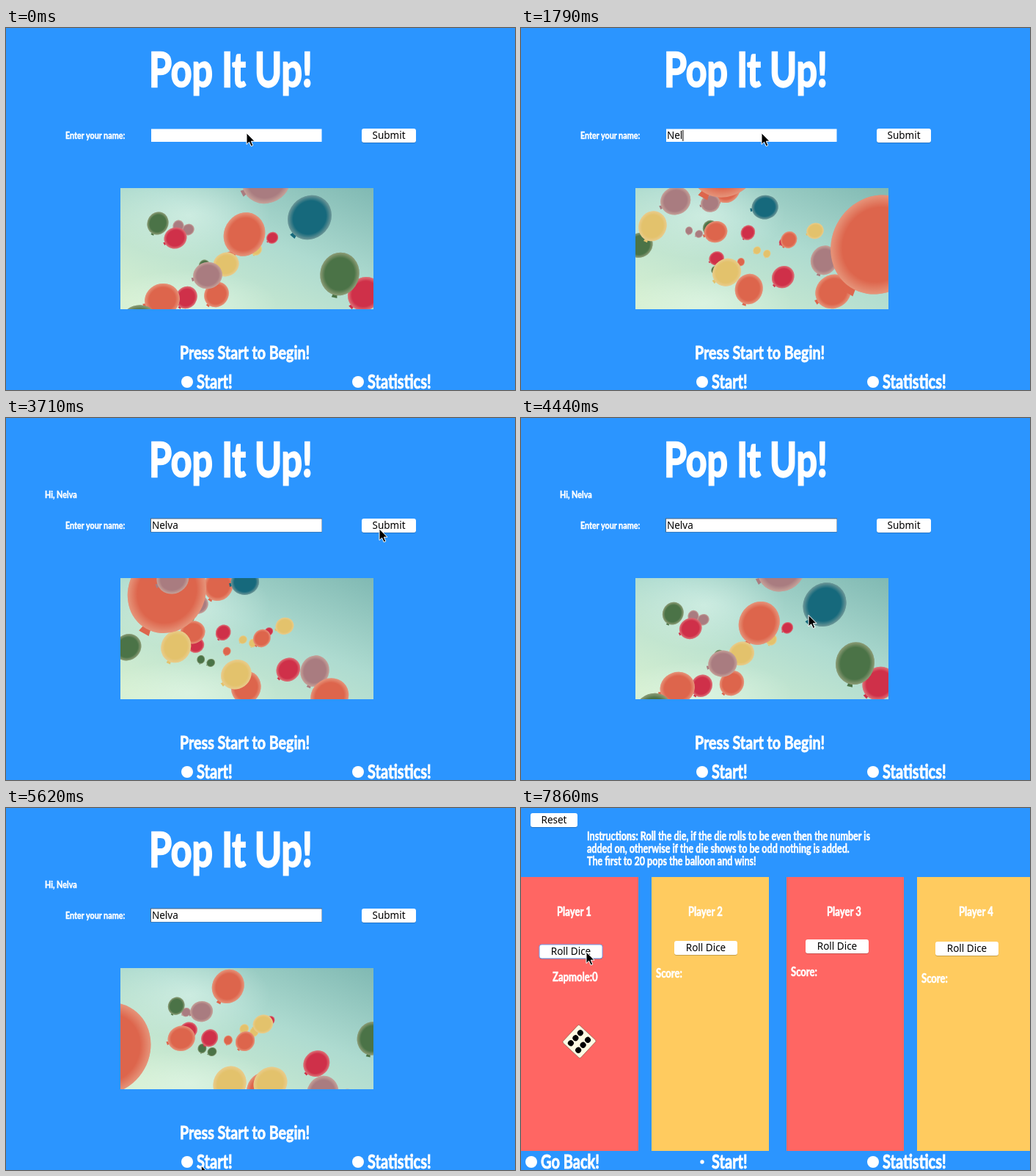
Recreate the animation shown at these times as an HTML page. Size 694 px wide and 493 px high, loop 8 s.

```html
<!DOCTYPE html>
<html lang="en">
<head>
<meta charset="utf-8">
<title>Pop It Up!</title>
<style>
html, body { margin: 0; width: 100%; height: 100%; overflow: hidden; background: #2b95ff; }
svg { display: block; }
.marker { font-family: Lato, sans-serif; font-weight: 700; fill: #fff; stroke: #fff; stroke-width: .035em; }
.ui { font: 13.5px "Noto Sans", sans-serif; fill: #000; }
</style>
</head>
<body>
<svg id="stage" width="694" height="493" viewBox="0 0 694 493">
  <defs>
    <linearGradient id="sky" x1="1" y1="0" x2=".1" y2="1">
      <stop offset="0" stop-color="#80b9b3"/>
      <stop offset=".45" stop-color="#aedbd0"/>
      <stop offset="1" stop-color="#d5efd0"/>
    </linearGradient>
    <radialGradient id="haze">
      <stop offset="0" stop-color="#e8fbf0" stop-opacity=".5"/>
      <stop offset="1" stop-color="#e8fbf0" stop-opacity="0"/>
    </radialGradient>
    <radialGradient id="rim">
      <stop offset=".75" stop-color="#f3dcc0" stop-opacity="0"/>
      <stop offset="1" stop-color="#f3dcc0" stop-opacity=".4"/>
    </radialGradient>
  </defs>
  <g id="home"></g>
  <g id="game"></g>
  <g id="menu"></g>
  <path id="cursor" d="M0 0V15.5L3.6 12.2 6.2 18 8.8 16.9 6.3 11.2H11Z" stroke="#fff"/>
</svg>
<script>
const $ = id => document.getElementById(id);
const LOOP = 8000, STEPS = 54, NAME = "Nelva";
const GREET = 3260, START = 5600, ROLL = 7700;

// ---- building blocks ----
const marker = (x, y, size, text, id = "") =>
  `<text id="${id}" class="marker" font-size="${size}" transform="translate(${x} ${y}) scale(.77 1)">${text}</text>`;
const rect = (x, y, w, h, fill, extra = "") =>
  `<rect x="${x}" y="${y}" width="${w}" height="${h}" fill="${fill}" ${extra}/>`;
const button = (x, y, w, label, id = "") =>
  rect(x, y + 1, w, 19, "#000", 'rx="3" opacity=".22"') +
  rect(x, y, w, 19, "#fff", `rx="3" id="${id}"`) +
  `<text class="ui" x="${x + w / 2}" y="${y + 14}" text-anchor="middle">${label}</text>`;
const radio = (x, label, id = "") =>
  `<circle id="${id}" cx="${x}" cy="482" r="8" fill="#fff"/>` + marker(x + 13, 491, 26, label);

// ---- balloons: colour, start x y, radius, end x y ----
const RED = "#cf3049", ORANGE = "#dd654c", YELLOW = "#e3c26c", GREEN = "#4b7347", TEAL = "#16697c", MAUVE = "#a97c80";
const balloons = [
  [GREEN, 207, 266, 15, 258, 272], [RED, 231, 286, 15, 267, 314],
  [ORANGE, 325, 281, 29, 280, 218], [YELLOW, 300, 322, 17, 402, 276],
  [RED, 246, 367, 15, 310, 278], [ORANGE, 213, 370, 23, 266, 277],
  [ORANGE, 287, 363, 17, 366, 288], [MAUVE, 275, 337, 19, 258, 238],
  [TEAL, 414, 258, 30, 414, 100], [TEAL, 300, 110, 26, 333, 245],
  [RED, 489, 362, 23, 356, 339], [GREEN, 455, 335, 28, 545, 300],
  [GREEN, 180, 403, 26, 162, 295], [ORANGE, 390, 430, 30, 310, 355],
  [YELLOW, 440, 440, 29, 279, 332], [MAUVE, 450, 500, 29, 413, 315],
  [ORANGE, 500, 490, 36, 425, 358], [YELLOW, 430, 540, 30, 177, 268],
  [MAUVE, 355, 208, 32, 340, 110], [ORANGE, 0, 560, 78, 280, 175],
  [MAUVE, 290, 130, 30, 210, 236], [ORANGE, 912, 295, 100, 483, 295]
];
// Far balloons barely move: a low-discrepancy scatter around the middle of the sky.
const distant = Array.from({ length: 8 }, (_, i) => {
  const x = 235 + 150 * (i * .618 % 1), y = 270 + 65 * (i * .414 % 1);
  return [[MAUVE, YELLOW, GREEN, RED, ORANGE][i % 5], x, y, 8, x - 6, y + 6];
});
const flock = [...distant, ...balloons];
const DRIFT = 2200, CROSSING = 1790, SHRINK = .66;

const balloonMarkup = flock.map(([color]) =>
  `<g class="balloon"><path d="M-.1 1L-.14 1.18H.14L.1 1Z" fill="${color}"/>` +
  `<ellipse rx=".95" ry="1.05" fill="${color}"/><ellipse rx=".95" ry="1.05" fill="url(#rim)"/></g>`).join("");

// ---- scenes ----
$("home").innerHTML =
  marker(195, 80, 65, "Pop It Up!") +
  marker(53, 109, 14, "Hi, " + NAME, "greeting") +
  marker(81, 151, 14, "Enter your name:") +
  rect(197, 136.5, 234, 19, "#4d6680", 'id="fieldEdge"') + rect(198, 137.5, 232.5, 17.5, "#fff") +
  '<text id="typed" class="ui" x="199" y="151"></text>' +
  rect(199, 139, 1, 15, "#000", 'id="caret"') +
  button(485, 137, 74, "Submit") +
  `<svg x="156" y="218" width="345" height="165" viewBox="156 218 345 165">
    ${rect(156, 218, 345, 165, "url(#sky)")}
    <ellipse cx="250" cy="255" rx="110" ry="60" fill="url(#haze)"/>
    <ellipse cx="250" cy="375" rx="120" ry="45" fill="url(#haze)"/>
    ${balloonMarkup}</svg>` +
  marker(237, 451, 25.5, "Press Start to Begin!");

const pips = [-7, 7].flatMap(x => [-9.5, 0, 9.5].map(y => `<circle cx="${x}" cy="${y}" r="4"/>`)).join("");
const player = (n, x, nameX, rollX, rollY, scoreY) =>
  rect(x, 94, 160, 373, n % 2 ? "#ff6663" : "#ffcb5f") +
  marker(nameX, 147, 17, "Player " + n) +
  button(rollX, rollY, 86, "Roll Dice", "roll" + n) +
  marker(x + 6, scoreY, 17, "Score:", "score" + n);
$("game").innerHTML =
  button(13, 7, 64, "Reset") +
  ["Instructions: Roll the die, if the die rolls to be even then the number is",
   "added on, otherwise if the die shows to be odd nothing is added.",
   "The first to 20 pops the balloon and wins!"].map((s, i) => marker(90, 44 + 17 * i, 16.3, s)).join("") +
  player(1, 0, 49, 25, 186, 236) + player(2, 178, 228, 209, 181, 231) +
  player(3, 362, 417, 388, 179, 229) + player(4, 540, 597, 565, 182, 238) +
  `<g id="die" transform="translate(79.5 318) rotate(43)">
    ${rect(-16.5, -16.5, 33, 33, "#fffbe3", 'rx="2" stroke="#8b5b4c" stroke-width=".7"')}${pips}</g>` +
  radio(14, "Go Back!");
$("menu").innerHTML = radio(247, "Start!", "startDot") + radio(480, "Statistics!");

// ---- motion ----
const mix = (a, b, k) => a + (b - a) * k;
const show = (id, on) => $(id).style.display = on ? "" : "none";
const balloonNodes = [...document.querySelectorAll(".balloon")];

// Balloons rise steadily, gather speed sideways and shrink as they recede.
function drawBalloons(t) {
  const k = t % DRIFT / CROSSING;
  flock.forEach(([, x, y, r, x2, y2], i) => {
    const angle = 10 + i * 37 % 70;
    balloonNodes[i].setAttribute("transform",
      `translate(${mix(x, x2, k ** 1.4)} ${mix(y, y2, k)}) rotate(${angle}) scale(${r * SHRINK ** k})`);
  });
}

const pointer = [[0, 328, 143], [2370, 328, 143], [2520, 333, 143], [3000, 509, 151], [3710, 509, 151],
  [4000, 500, 118], [4700, 330, 355], [5180, 266, 487], [5480, 266, 487], [5770, 311, 483],
  [6370, 311, 483], [6515, 271, 255], [7260, 95, 178], [7550, 89, 196], [LOOP, 89, 196]];

function drawPointer(t) {
  const n = pointer.findIndex(p => p[0] > t);
  const [t0, x0, y0] = pointer[n - 1], [t1, x1, y1] = pointer[n];
  const k = (t - t0) / (t1 - t0);
  $("cursor").setAttribute("transform", `translate(${mix(x0, x1, k)} ${mix(y0, y1, k)})`);
}

function draw(t) {
  const playing = t >= START, rolled = t >= ROLL;
  show("home", !playing);
  show("game", playing);
  $("startDot").setAttribute("r", playing ? 2.7 : 8);
  if (playing) {
    show("die", rolled);
    $("score1").textContent = rolled ? "Zapmole:0" : "Score:";
    $("score1").setAttribute("transform", `translate(${rolled ? 43 : 6} 236) scale(.77 1)`);
    $("roll1").setAttribute("stroke", rolled ? "#6b9cf0" : "none");
  } else {
    const count = Math.max(0, Math.min(NAME.length, Math.floor((t - 900) / 290)));
    $("typed").textContent = NAME.slice(0, count);
    $("caret").setAttribute("x", 199 + (count ? $("typed").getComputedTextLength() : 0));
    show("caret", t >= 140 && t < GREET);
    show("greeting", t >= GREET);
    show("fieldEdge", t >= GREET);
    drawBalloons(t);
  }
  drawPointer(t);
}

// The picture advances in even steps, like a screen capture.
function frame() {
  const t = performance.now() % LOOP;
  const step = Math.min(STEPS - 1, Math.floor((t + 8) * STEPS / LOOP));
  draw(step * LOOP / STEPS);
  requestAnimationFrame(frame);
}
frame();
</script>
</body>
</html>
```
